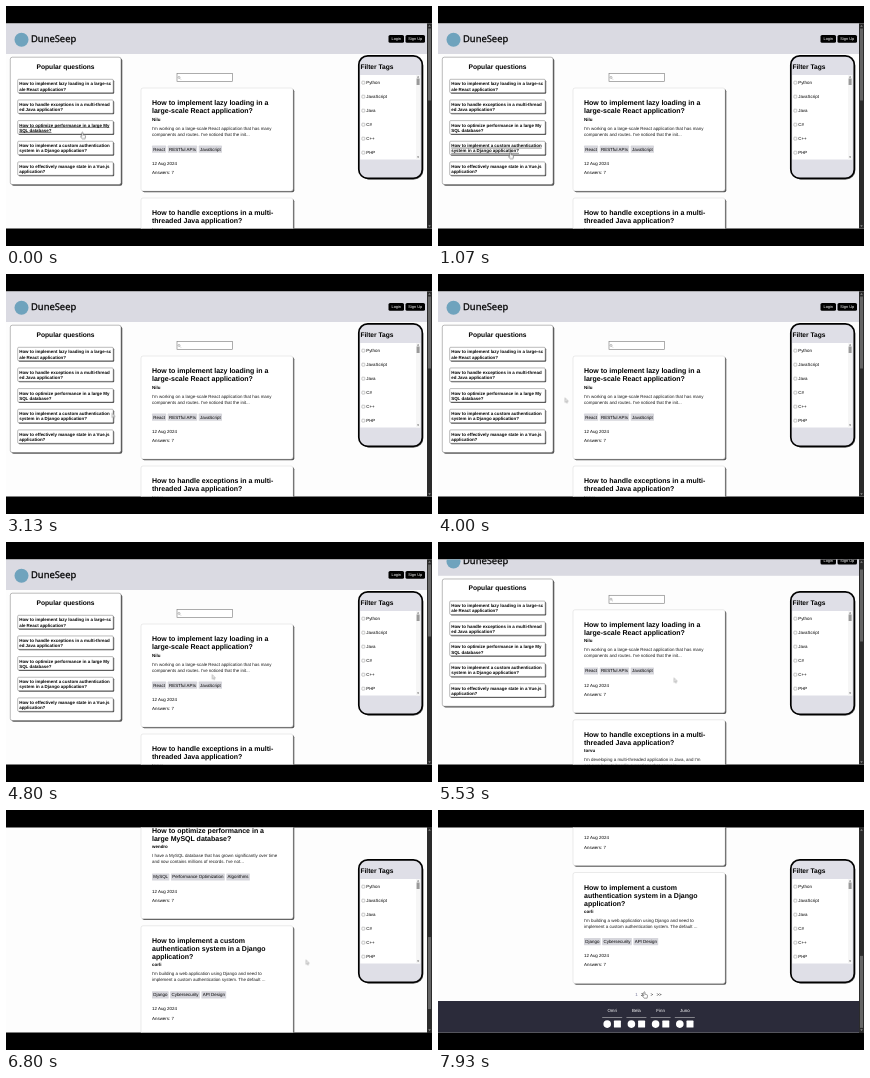
These frames come from a looping animation (426x240 px, 8 s). An HTML page:

```html
<!DOCTYPE html>
<html lang="en">
<head>
<meta charset="utf-8">
<title>Question board</title>
<style>
@property --scroll { syntax: "<number>"; inherits: true; initial-value: 0; }
html, body { margin: 0; width: 100%; height: 100%; overflow: hidden; background: #000; }
svg {
  display: block; width: 100vw; height: 100vh;
  font: 4.44px "Liberation Sans", Arial, sans-serif;
  text-rendering: geometricPrecision;
  animation: scroll 8s linear infinite;
}
text { white-space: pre; }
.bold { font-weight: 700; }
.brand { font: 9.4px "Noto Sans", "Open Sans", sans-serif; stroke: #000; stroke-width: .25; }
.page { transform: translateY(calc(var(--scroll) * -1px)); }
.thumb { transform: translateY(calc(var(--scroll) * .353px)); }
.pointer { animation: move 8s ease-in-out infinite; }
.hand { animation: hand 8s step-end infinite; }
.arrow { animation: arrow 8s step-end infinite; }
.hover { opacity: 0; }
.hover2 { animation: hover2 8s step-end infinite; }
.hover3 { animation: hover3 8s step-end infinite; }
.hover4 { animation: hover4 8s step-end infinite; }

@keyframes scroll {
  0%, 68.3% { --scroll: 0; }
  69.125% { --scroll: 14; }
  75% { --scroll: 118; }
  80% { --scroll: 207; }
  85% { --scroll: 296; }
  88%, 100% { --scroll: 349.5; }
}
@keyframes move {
  0%, 5% { transform: translate(77px, 129.5px); }
  11%, 18% { transform: translate(73px, 149.5px); }
  24%, 34% { transform: translate(73px, 166.5px); }
  43%, 53% { transform: translate(128.5px, 126.5px); }
  64%, 75% { transform: translate(237.5px, 138.5px); }
  84%, 89% { transform: translate(301.5px, 152.5px); }
  97%, 100% { transform: translate(207px, 185px); }
}
@keyframes hand { 0% { opacity: 1; } 37% { opacity: 0; } 96%, 100% { opacity: 1; } }
@keyframes arrow { 0% { opacity: 0; } 37% { opacity: 1; } 96%, 100% { opacity: 0; } }
@keyframes hover2 { 0% { opacity: 1; } 8%, 100% { opacity: 0; } }
@keyframes hover3 { 0% { opacity: 0; } 8.6% { opacity: 1; } 20%, 100% { opacity: 0; } }
@keyframes hover4 { 0% { opacity: 0; } 21% { opacity: 1; } 36%, 100% { opacity: 0; } }
</style>
</head>
<body>
<svg viewBox="0 0 426 240" preserveAspectRatio="none">
  <defs>
    <clipPath id="view"><rect y="17.5" width="426" height="205"/></clipPath>
    <filter id="soft" x="-10%" y="-10%" width="120%" height="120%"><feGaussianBlur stdDeviation=".7"/></filter>
  </defs>
  <rect width="426" height="240"/>
  <g clip-path="url(#view)">
    <rect y="17" width="426" height="206" fill="#fdfdfd"/>
    <g class="page" id="page"></g>
    <g id="filters"></g>
    <rect x="421" y="17" width="5" height="206" fill="#2b2b2b"/>
    <path d="M422.2 20.8l1.3-1.8 1.3 1.8zM422.2 219.2l1.3 1.8 1.3-1.8z" fill="#888"/>
    <rect class="thumb" x="422" y="22.5" width="3" height="72" fill="#666"/>
    <g class="pointer" fill="#fff" stroke-linejoin="round">
      <path class="hand" stroke="#333" stroke-width=".45" d="M-1.2 .8V-2.8q.6-.9 1.2 0V-.8l2.1.6q.6.2.5 1L2.1 3.2H-.8L-2.6.9q.4-.9 1.4-.1z"/>
      <path class="arrow" stroke="#666" stroke-width=".4" d="M-1.4-2.4V1.7l1-.8.7 1.5.7-.3L.3.6h1.3z"/>
    </g>
  </g>
</svg>
<script>
const page = document.getElementById("page");
const filters = document.getElementById("filters");

function add(parent, name, attrs, content) {
  const node = document.createElementNS("http://www.w3.org/2000/svg", name);
  for (const key in attrs) node.setAttribute(key, attrs[key]);
  if (content) node.textContent = content;
  return parent.appendChild(node);
}
const rect = (parent, x, y, width, height, fill, more) =>
  add(parent, "rect", { x, y, width, height, fill, ...more });
const text = (parent, x, y, content, more) =>
  add(parent, "text", { x, y, fill: "#000", ...more }, content);
const bold = (parent, x, y, content, size = 4.44) =>
  text(parent, x, y, content, { class: "bold", style: `font-size:${size}px` });

function panel(parent, x, y, w, h, { fill = "#fff", stroke = "#999", line = .5, rx = 2, drop = 1.3 } = {}) {
  rect(parent, x + drop, y + drop, w, h, "#555", { rx, filter: "url(#soft)" });
  rect(parent, x, y, w, h, fill, { rx, stroke, "stroke-width": line });
}

function button(x, width, label) {
  rect(page, x, 29, width, 7.8, "#000", { rx: 1.6 });
  text(page, x + width / 2, 34.3, label, { fill: "#fff", "text-anchor": "middle", style: "font-size:3.9px" });
}

function header() {
  rect(page, 0, 17, 421, 31, "#dadae2");
  add(page, "circle", { cx: 15.5, cy: 33.8, r: 7, fill: "#6fa3bd" });
  text(page, 25, 36.2, "DuneSeep", { class: "brand" });
  button(382.5, 15.5, "Login");
  button(399.5, 19.5, "Sign Up");
  rect(page, 171, 67.5, 55.5, 8, "#fff", { stroke: "#777", "stroke-width": .6 });
  add(page, "path", { d: "M173.7 72.3l1.2 1.2M172 71.4a1 1 0 1 0 2 0a1 1 0 1 0-2 0", fill: "none", stroke: "#777", "stroke-width": .45 });
}

function sidebar() {
  panel(page, 4.3, 51.2, 110.7, 127.3, { stroke: "#777" });
  bold(page, 30.5, 62.6, "Popular questions", 6.66);
  const questions = [
    ["How to implement lazy loading in a large-sc", "ale React application?"],
    ["How to handle exceptions in a multi-thread", "ed Java application?"],
    ["How to optimize performance in a large My", "SQL database?"],
    ["How to implement a custom authentication", "system in a Django application?"],
    ["How to effectively manage state in a Vue.js", "application?"]
  ];
  questions.forEach((lines, i) => {
    const top = 73.3 + i * 20.65;
    panel(page, 11.7, top, 95.5, 13.4, { stroke: "#777", rx: 1, drop: 1 });
    lines.forEach((line, j) => {
      const y = top + 6.1 + j * 5.11;
      const label = bold(page, 13.2, y, line);
      rect(page, 13.2, y + .45, label.getComputedTextLength(), .45, "#000", { class: `hover hover${i}` });
    });
  });
}

function card(top, title, user, body, tags) {
  const extra = (title.length - 2) * 7.9;
  const x = 146;
  panel(page, 135, top, 152, 103 + extra, { stroke: "#d4d4d4" });
  title.forEach((line, i) => bold(page, x, top + 17.4 + i * 7.8, line, 7));
  const y = top + extra;
  bold(page, x, y + 32.6, user);
  body.forEach((line, i) => text(page, x, y + 41.7 + i * 5.8, line, { fill: "#1a1a1a" }));
  let left = x;
  for (const tag of tags) {
    const box = rect(page, left, y + 57.6, 0, 7.2, "#d6d6dc", { rx: .6 });
    const width = text(page, left + 1.3, y + 62.7, tag).getComputedTextLength() + 2.6;
    box.setAttribute("width", width);
    left += width + 1.5;
  }
  text(page, x, y + 76.8, "12 Aug 2024");
  text(page, x, y + 86, "Answers: 7");
}

function cards() {
  card(82, ["How to implement lazy loading in a", "large-scale React application?"], "Nilu",
    ["I'm working on a large-scale React application that has many", "components and routes. I've noticed that the init..."],
    ["React", "RESTful APIs", "JavaScript"]);
  card(192, ["How to handle exceptions in a multi-", "threaded Java application?"], "torvu",
    ["I'm developing a multi-threaded application in Java, and I'm", "not sure how to handle exceptions that occur in..."],
    ["Java", "Exception Handling", "Multithreading"]);
  card(302, ["How to optimize performance in a", "large MySQL database?"], "wendro",
    ["I have a MySQL database that has grown significantly over time", "and now contains millions of records. I've not..."],
    ["MySQL", "Performance Optimization", "Algorithms"]);
  card(412, ["How to implement a custom", "authentication system in a Django", "application?"], "corli",
    ["I'm building a web application using Django and need to", "implement a custom authentication system. The default ..."],
    ["Django", "Cybersecurity", "API Design"]);
}

function footer() {
  text(page, 197.3, 535.2, "1", { fill: "#77779a" });
  text(page, 203, 535.2, "2");
  text(page, 212.5, 535.2, ">");
  text(page, 218.5, 535.2, ">>");
  rect(page, 0, 540.5, 421, 33, "#2b2b3a");
  ["Omri", "Bela", "Finn", "Juno"].forEach((name, i) => {
    const x = 174.2 + i * 24.2;
    text(page, x, 551.6, name, { fill: "#fff", "text-anchor": "middle" });
    rect(page, x - 10, 556.7, 20, .5, "#ddd");
    add(page, "circle", { cx: x - 5, cy: 563.6, r: 3.8, fill: "#fff" });
    rect(page, x + 1.7, 560.1, 7, 7, "#fff", { rx: .6 });
  });
}

function filterPanel() {
  panel(filters, 352.8, 49.8, 63.5, 122.6, { fill: "#dfdfe7", stroke: "#000", line: 1.7, rx: 9, drop: 1 });
  bold(filters, 354.4, 62.8, "Filter Tags", 6.66);
  rect(filters, 354.2, 69, 60, 84.5, "#fff");
  ["Python", "JavaScript", "Java", "C#", "C++", "PHP"].forEach((tag, i) => {
    const y = 76.6 + i * 14;
    rect(filters, 355.9, y - 1.4, 2.9, 2.9, "#fff", { rx: .5, stroke: "#777", "stroke-width": .4 });
    text(filters, 360.2, y + 1.6, tag);
  });
  rect(filters, 410, 69, 4.2, 84.5, "#f6f6f6");
  rect(filters, 410.6, 72.5, 3, 6.5, "#999");
  add(filters, "path", { d: "M411 71.4l1.1-1.5 1.1 1.5zM411 150.4l1.1 1.5 1.1-1.5z", fill: "#666" });
}

header();
sidebar();
cards();
footer();
filterPanel();
</script>
</body>
</html>
```
